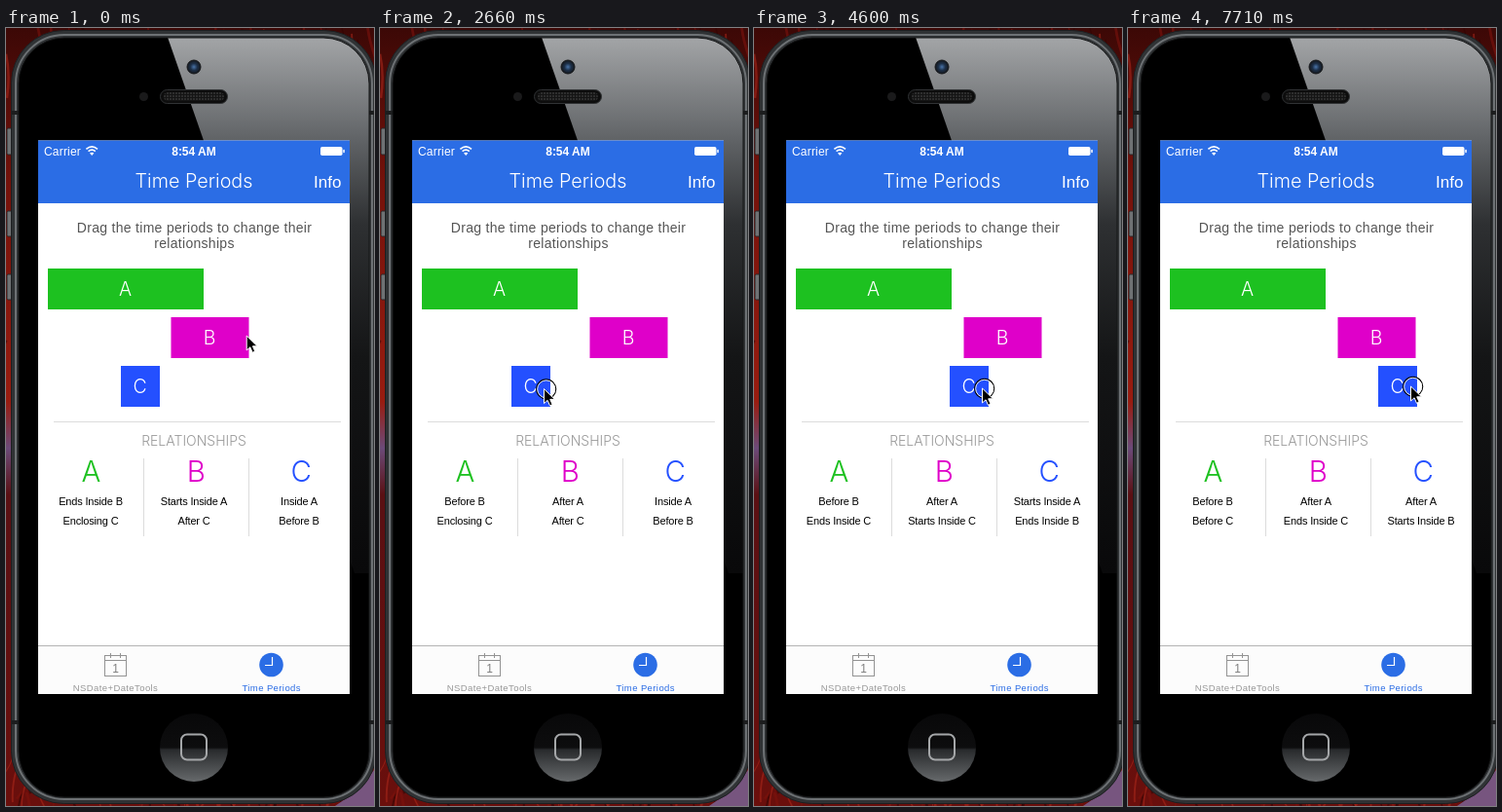
Animation of 378 by 799 pixels, one loop 8 s. Source, as an HTML page:

```html
<!DOCTYPE html>
<html lang="en">
<head>
<meta charset="utf-8">
<title>Time Periods</title>
<style>
  html, body { margin: 0; width: 100%; height: 100%; overflow: hidden; background: #000; }
  svg { display: block; width: 100%; height: 100%; }
  text { font-family: "Liberation Sans", Arial, sans-serif; text-anchor: middle; }
  .light { font-family: Inter, "Liberation Sans", sans-serif; font-weight: 300; }
  .big { font-size: 29.5px; }
  .label { font-size: 19.5px; fill: #fff; }
  .rel { font-size: 11px; letter-spacing: -.17px; fill: #000; }
  .hint { font-size: 14px; letter-spacing: .3px; fill: #555; }
  .tab { font-size: 9.5px; letter-spacing: .4px; }
</style>
</head>
<body>
<svg viewBox="0 0 378 799" preserveAspectRatio="none">
  <defs>
    <linearGradient id="backdrop" x2="0" y2="1">
      <stop offset="0" stop-color="#3c0806"/>
      <stop offset=".2" stop-color="#74120b"/>
      <stop offset=".48" stop-color="#981c10"/>
      <stop offset=".54" stop-color="#6b4a78"/>
      <stop offset=".6" stop-color="#5a1013"/>
      <stop offset="1" stop-color="#6a0f0c"/>
    </linearGradient>
    <linearGradient id="gloss" gradientUnits="userSpaceOnUse" x1="0" y1="8" x2="0" y2="560">
      <stop offset="0" stop-color="#a4a6a8"/>
      <stop offset=".2" stop-color="#5e6164"/>
      <stop offset=".35" stop-color="#2e3032"/>
      <stop offset=".6" stop-color="#141516"/>
      <stop offset="1" stop-color="#09090a"/>
    </linearGradient>
    <linearGradient id="home" x2="0" y2="1">
      <stop offset="0" stop-color="#080809"/>
      <stop offset=".5" stop-color="#0d0d0e"/>
      <stop offset=".53" stop-color="#282a2c"/>
      <stop offset="1" stop-color="#66696b"/>
    </linearGradient>
    <radialGradient id="lens">
      <stop offset="0" stop-color="#4a74a8"/>
      <stop offset=".5" stop-color="#1d3049"/>
      <stop offset="1" stop-color="#15181c"/>
    </radialGradient>
    <pattern id="mesh" width="3" height="3" patternUnits="userSpaceOnUse">
      <rect width="3" height="3" fill="#141414"/>
      <circle cx="1" cy="1" r=".8" fill="#4c4c4c"/>
    </pattern>
    <clipPath id="face"><rect x="13" y="10" width="360" height="780" rx="47"/></clipPath>
  </defs>

  <rect width="378" height="799" fill="url(#backdrop)"/>
  <g id="strands" fill="none"/>
  <path d="M338 799Q362 784 378 762V799Z" fill="#77557f"/>

  <!-- phone -->
  <g fill="#6f7274" stroke="#26282a">
    <rect x="1" y="103" width="6" height="27" rx="1.5"/>
    <rect x="1" y="188" width="6" height="26" rx="1.5"/>
    <rect x="1" y="253" width="6" height="26" rx="1.5"/>
  </g>
  <rect x="5.5" y="2.5" width="375" height="794" rx="54" fill="#303335" stroke="#1d1f21"/>
  <rect x="10" y="7" width="366" height="785" rx="50" fill="none" stroke="#6d7174" stroke-width="2"/>
  <path d="M6 87H13M6 713H13M372 87H378M372 713H378" stroke="#1c1d1e" stroke-width="4"/>
  <g clip-path="url(#face)">
    <rect x="13" y="10" width="360" height="780"/>
    <path d="M165.5 8L358 560H378V8Z" fill="url(#gloss)"/>
  </g>
  <rect x="13" y="10" width="360" height="780" rx="47" fill="none" stroke="#151617"/>
  <circle cx="193" cy="40" r="7" fill="url(#lens)" stroke="#15171a"/>
  <circle cx="141.5" cy="70.5" r="4.5" fill="#1a1a1b"/>
  <rect x="158.5" y="63.5" width="69" height="14" rx="7" fill="#0d0d0d" stroke="#303234"/>
  <rect x="162" y="66" width="62" height="9" rx="4.5" fill="url(#mesh)"/>
  <circle cx="193" cy="739" r="35" fill="url(#home)"/>
  <rect x="180" y="725.5" width="26" height="26" rx="6" fill="none" stroke="#a5a7a9" stroke-width="2"/>

  <!-- screen -->
  <rect x="33" y="115.5" width="320" height="568.5" fill="#fff"/>
  <rect x="33" y="115.5" width="320" height="64.5" fill="#2b6de5"/>
  <g fill="#fff">
    <text x="58" y="130.5" font-size="12" letter-spacing=".2">Carrier</text>
    <text x="193" y="130.5" font-size="12" font-weight="bold">8:54 AM</text>
    <text x="193" y="164" font-size="19.8" class="light">Time Periods</text>
    <text x="330.3" y="164" font-size="17">Info</text>
    <rect x="323" y="122" width="22.5" height="9" rx="1.8"/>
    <rect x="346.3" y="124.7" width="1.5" height="3.6" rx=".7"/>
    <path d="M88.2 131L86 128.6Q88.2 126.9 90.4 128.6Z"/>
    <path d="M84.6 126.7Q88.2 123.7 91.8 126.7M82.4 124.3Q88.2 119.5 94 124.3" fill="none" stroke="#fff" stroke-width="1.7"/>
  </g>
  <text x="193.5" y="209.5" class="hint">Drag the time periods to change their</text>
  <text x="193.5" y="226" class="hint">relationships</text>
  <g id="blocks"/>
  <path d="M49 404.5H344M141.5 442V522M249.5 442V522" stroke="#dcdcdc" fill="none"/>
  <text x="193" y="428.5" font-size="14" fill="#999" class="light">RELATIONSHIPS</text>
  <g id="columns"/>

  <!-- tab bar -->
  <rect x="33" y="634" width="320" height="50" fill="#fcfcfc"/>
  <path d="M33 634.5H353" stroke="#b4b4b4"/>
  <g fill="none" stroke="#939393">
    <rect x="101.5" y="644.5" width="22" height="21"/>
    <path d="M101.5 649.5H123.5M107.5 642V647M117.5 642V647"/>
  </g>
  <text x="112.5" y="661.5" font-size="12" fill="#808080">1</text>
  <text x="112.5" y="680.5" class="tab" fill="#979797">NSDate+DateTools</text>
  <circle cx="272.5" cy="654" r="12.3" fill="#2b6de5"/>
  <path d="M273.5 646V654.5H266" fill="none" stroke="#fff" stroke-width="1.2"/>
  <text x="272.7" y="680.5" class="tab" fill="#2b6de5">Time Periods</text>

  <g id="cursor">
    <g id="press" fill="none">
      <circle cx="2.2" cy=".3" r="10" stroke="#000" stroke-width="1.2"/>
      <circle cx="2.2" cy=".3" r="9" stroke="#fff" stroke-width=".9"/>
    </g>
    <path d="M0 0V15L3.6 11.8L6 17.3L8.6 16.1L6.2 10.8H11Z" stroke="#fff"/>
  </g>
</svg>
<script>
const LOOP = 8000, TICK = 148.2, LAG = 18;
const $ = id => document.getElementById(id);

function add(parent, tag, attrs, text = '') {
  const el = document.createElementNS('http://www.w3.org/2000/svg', tag);
  for (const key in attrs) el.setAttribute(key, attrs[key]);
  el.textContent = text;
  return parent.appendChild(el);
}

// Position keys: [tick, value]
const bKeys = [[0, 169.5], [2, 176], [5, 197], [7, 207], [8, 212.5], [9, 215.5]];
const cKeys = [[15, 118], [16, 119], [19, 143], [22, 167.5], [23, 167.5], [30, 199], [31, 201],
  [32, 215], [33, 240], [35, 297], [36, 285], [38, 239], [42, 252], [46, 255], [49, 255], [52, 257]];
const travelX = [[9, 293], [10, 290], [11, 262], [12, 205], [13, 155], [14, 141], [15, 149], [16, 152.5]];
const cursorY = [[9, 316], [10, 319], [11, 335], [12, 362], [13, 380], [14, 374], [15, 371],
  [22, 370], [31, 370], [42, 367.5], [52, 368]];

function at(keys, k) {
  const i = keys.findIndex(key => key[0] > k);
  if (i === 0) return keys[0][1];
  if (i < 0) return keys[keys.length - 1][1];
  const [k0, v0] = keys[i - 1], [k1, v1] = keys[i];
  return v0 + (v1 - v0) * (k - k0) / (k1 - k0);
}

const periods = [
  { name: 'A', x: 43, y: 247, w: 160, color: '#1dc120', mid: 87.5 },
  { name: 'B', x: 169.5, y: 297, w: 80, color: '#df00c9', mid: 195.3 },
  { name: 'C', x: 118, y: 347, w: 40, color: '#2450ff', mid: 303.3 }
];
const [A, B, C] = periods;

periods.forEach((p, i) => {
  p.block = add($('blocks'), 'g', {});
  add(p.block, 'rect', { width: p.w, height: 42, fill: p.color });
  add(p.block, 'text', { x: p.w / 2 - .5, y: 28, class: 'light label' }, p.name);
  add($('columns'), 'text', { x: p.mid, y: 465.5, class: 'light big', fill: p.color }, p.name);
  const x = [87, 193, 301][i];
  p.lines = [489.5, 509.5].map(y => add($('columns'), 'text', { x, y, class: 'rel' }));
  p.others = periods.filter(q => q !== p);
});

function relation(p, q) {
  const pEnd = p.x + p.w, qEnd = q.x + q.w;
  if (pEnd <= q.x) return 'Before';
  if (p.x >= qEnd) return 'After';
  if (p.x <= q.x && pEnd >= qEnd) return 'Enclosing';
  if (p.x >= q.x && pEnd <= qEnd) return 'Inside';
  return p.x > q.x ? 'Starts Inside' : 'Ends Inside';
}

// Feathery backdrop
let seed = 7;
const rnd = () => (seed = seed * 16807 % 2147483647) / 2147483647;
for (let i = 0; i < 160; i++) {
  const x = rnd() * 378, y = [rnd() * 40 - 10, rnd() * 799, 740 + rnd() * 50][i % 3];
  add($('strands'), 'path', {
    d: `M${x} ${y}q${rnd() * 20 - 10} 20 ${rnd() * 30 - 15} 45`,
    stroke: ['#a9271a', '#300504', '#7d130d'][Math.floor(rnd() * 3)],
    'stroke-width': 1 + rnd() * 2, opacity: .6
  });
}

function draw(t) {
  const k = Math.floor((t + LAG) / TICK);
  B.x = at(bKeys, k);
  C.x = at(cKeys, k);
  for (const p of periods) {
    p.block.setAttribute('transform', `translate(${p.x} ${p.y})`);
    p.others.forEach((q, i) => p.lines[i].textContent = `${relation(p, q)} ${q.name}`);
  }
  const x = k < 9 ? B.x + 77.7 : k < 16 ? at(travelX, k) : C.x + 33.5;
  $('cursor').setAttribute('transform', `translate(${x} ${at(cursorY, k)})`);
  $('press').setAttribute('visibility', k < 16 ? 'hidden' : 'visible');
}

function frame() {
  draw(performance.now() % LOOP);
  requestAnimationFrame(frame);
}
frame();
</script>
</body>
</html>
```
